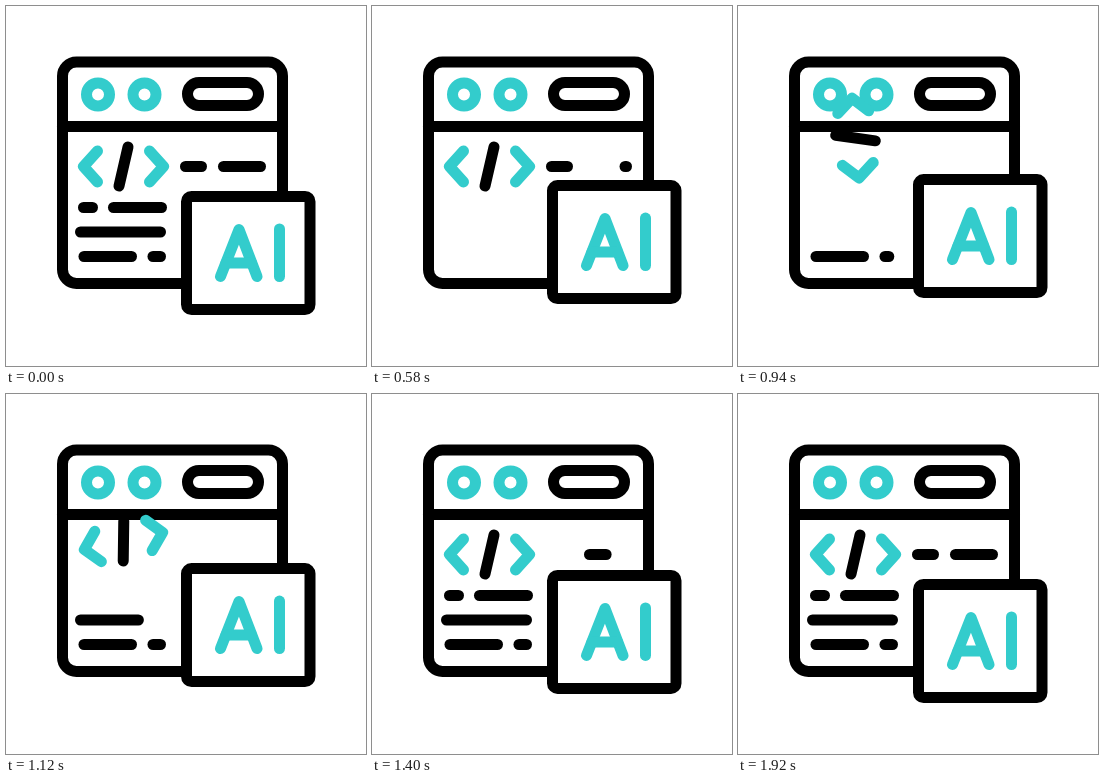
Animation, 360 px wide and 360 px high, one loop 1.96 s. Source, as an HTML page with a canvas:

```html
<!DOCTYPE html>
<html lang="en">
<head>
<meta charset="utf-8">
<title>AI code window</title>
<style>
  html, body { margin: 0; width: 100%; height: 100%; overflow: hidden; background: #fff; }
  canvas { display: block; width: 360px; height: 360px; }
</style>
</head>
<body>
<canvas id="stage"></canvas>
<script>
const LOOP = 1960;
const INK = '#000';
const TEAL = '#33cccc';
const canvas = document.getElementById('stage');
const ctx = canvas.getContext('2d');
const scale = window.devicePixelRatio || 1;
canvas.width = canvas.height = 360 * scale;

// Code dashes in typing order: [y, from, to]
const dashes = [
  [250.5, 78, 125.5], [250.5, 147, 154.5],
  [226, 74.5, 154.5],
  [201.5, 77.5, 86.5], [201.5, 107.5, 155.5],
  [160.5, 217.5, 254.5], [160.5, 179.5, 195.5]
];
const ERASE = { start: 171, speed: 0.555 };
const TYPE = { start: 791, speed: 0.342 };
const SPIN = { start: 837, end: 1159, height: 32.5 };
const LIFT = { peak: 980, end: 1860, height: 17 };

const clamp = v => Math.min(1, Math.max(0, v));
const ease = v => (1 - Math.cos(Math.PI * clamp(v))) / 2;

function line(color, ...pts) {
  ctx.strokeStyle = color;
  ctx.beginPath();
  for (let i = 0; i < pts.length; i += 2) ctx.lineTo(pts[i], pts[i + 1]);
  ctx.stroke();
}

function box(x, y, w, h, r, fill) {
  ctx.beginPath();
  ctx.roundRect(x, y, w, h, r);
  if (fill) {
    ctx.fillStyle = fill;
    ctx.fill();
  }
  ctx.strokeStyle = INK;
  ctx.stroke();
}

function ring(x, y) {
  ctx.strokeStyle = TEAL;
  ctx.beginPath();
  ctx.arc(x, y, 11.5, 0, Math.PI * 2);
  ctx.stroke();
}

function drawWindow() {
  box(56.5, 56, 220, 221.5, 14);
  line(INK, 56.5, 120.5, 276.5, 120.5);
  ring(92, 88.5);
  ring(138.5, 88.5);
  box(181.5, 76.5, 71, 23, 11.5);
}

function drawDashes(t) {
  const typing = t >= TYPE.start;
  const phase = typing ? TYPE : ERASE;
  let done = Math.max(0, (t - phase.start) * phase.speed);
  for (const [y, from, to] of dashes) {
    const cut = from + Math.max(0, Math.min(done, to - from));
    const a = typing ? from : cut;
    const b = typing ? cut : to;
    if (b > a) line(INK, a, y, b, y);
    done -= to - from;
  }
}

function drawTag(t) {
  const p = clamp((t - SPIN.start) / (SPIN.end - SPIN.start));
  ctx.save();
  ctx.translate(117.5, 160.5 - SPIN.height * 4 * p * (1 - p));
  ctx.rotate(ease(p) * Math.PI * 2);
  line(TEAL, -26, -15.5, -40, 0, -26, 15.5);
  line(TEAL, 26, -15.5, 40, 0, 26, 15.5);
  line(INK, 4.5, -19.5, -4.5, 19.5);
  ctx.restore();
}

function drawCard(t) {
  const rise = t < LIFT.peak
    ? ease(t / LIFT.peak)
    : 1 - ease((t - LIFT.peak) / (LIFT.end - LIFT.peak));
  ctx.save();
  ctx.translate(0, -LIFT.height * rise);
  box(180.5, 190.5, 123.5, 113, 5, '#fff');
  line(TEAL, 214.5, 270.5, 233, 223.5, 251, 270.5);
  line(TEAL, 220, 257, 245.5, 257);
  line(TEAL, 273.5, 223, 273.5, 270.5);
  ctx.restore();
}

function draw(t) {
  ctx.setTransform(scale, 0, 0, scale, 0, 0);
  ctx.fillStyle = '#fff';
  ctx.fillRect(0, 0, 360, 360);
  ctx.lineWidth = 11;
  ctx.lineCap = ctx.lineJoin = 'round';
  drawWindow();
  drawDashes(t);
  drawTag(t);
  drawCard(t);
}

const begin = performance.now();
function tick() {
  draw((performance.now() - begin) % LOOP);
  requestAnimationFrame(tick);
}
tick();
</script>
</body>
</html>
```
